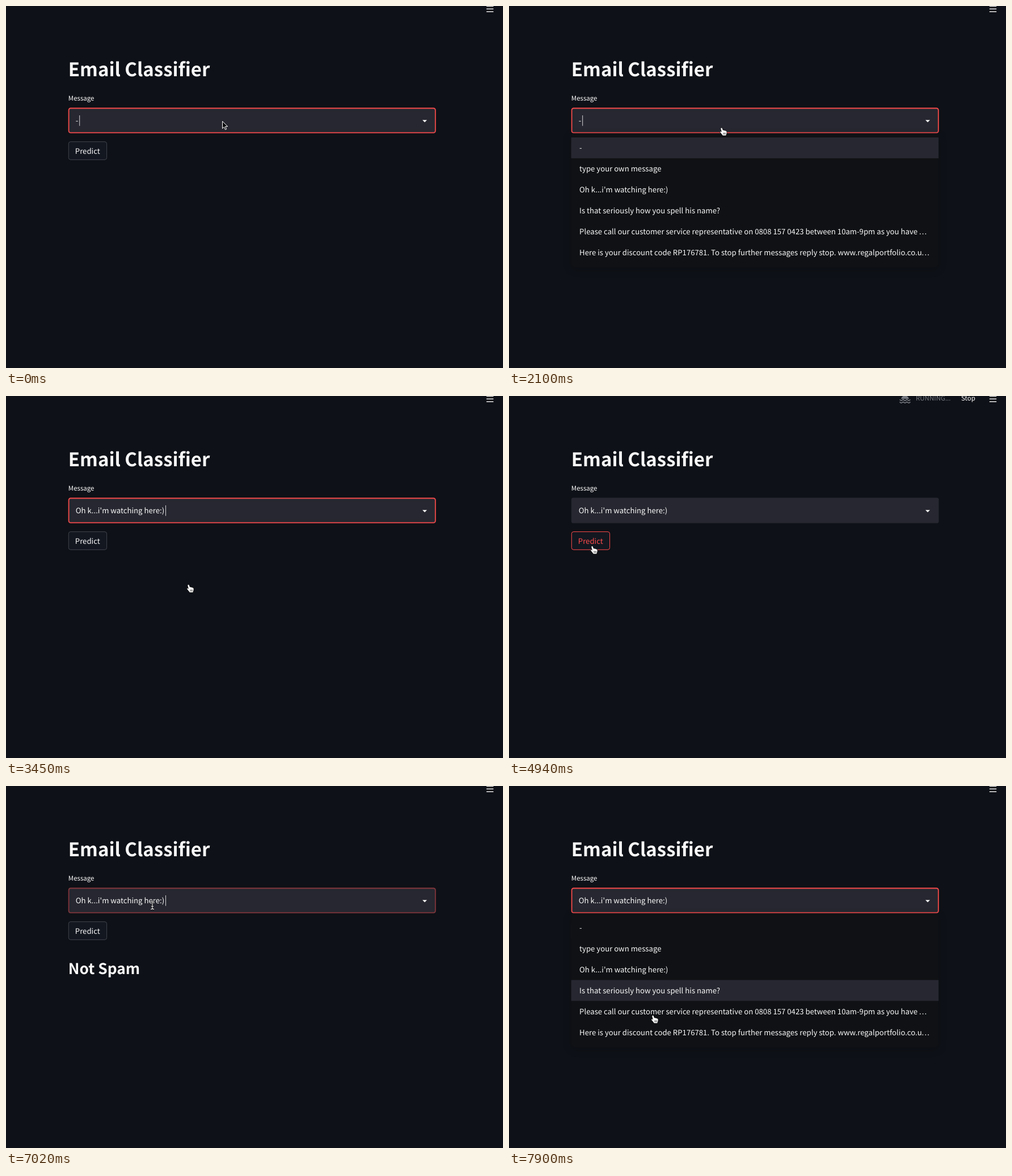
Write an HTML page with a canvas that moves like this. It is 876 px wide and 639 px high and loops after 8 s.

```html
<!DOCTYPE html>
<html lang="en">
<head>
<meta charset="utf-8">
<title>Email Classifier</title>
<style>
  html, body { margin: 0; width: 100%; height: 100%; overflow: hidden; background: #0e1117; }
  canvas { display: block; width: 876px; height: 639px; }
</style>
</head>
<body>
<canvas id="stage"></canvas>
<script>
const W = 876, H = 639, LOOP = 8000;
const FONT = '"Noto Sans CJK JP", "Noto Sans CJK SC", "Noto Sans CJK KR", "Open Sans", sans-serif';
const BG = '#0e1117', PANEL = '#262730', INK = '#fafafa', RED = '#ff4b4b';
const BODY = 13.18, SMALL = 11.53;
const ROW = 36.83, LIST_TOP = 232;
const OPTIONS = [
  '-',
  'type your own message',
  "Oh k...i'm watching here:)",
  'Is that seriously how you spell his name?',
  'Please call our customer service representative on 0808 157 0423 between 10am-9pm as you have …',
  'Here is your discount code RP176781. To stop further messages reply stop. www.regalportfolio.co.u…'
];

// Step tracks: [start, value]
const focus = [[0, 1], [1650, 0.1], [1800, 0.5], [1950, 1], [4490, 0.35], [4640, 0], [7020, 0.45], [7170, 1]];
const caret = [[0, 1], [450, 0], [900, 1], [1350, 0], [1950, 1], [2400, 0], [2850, 1], [3300, 1],
  [3750, 0], [4200, 1], [4490, 0], [7020, 1], [7460, 0]];
const menu = [[0, 0], [1950, 1], [3300, 0], [7170, 1]];
const hover = [[0, 0], [2400, 1], [2550, 2], [7600, 1], [7750, 2], [7900, 3]];
const chosen = [[0, 0], [3300, 2]];
const running = [[0, 0], [3600, 1], [5230, 0]];
const result = [[0, 0], [5230, 1]];
const button = [[0, 0], [4340, 1], [5530, 0.4], [5680, 0]];
const pointer = [
  [0, ['arrow', 381, 203]], [1950, ['hand', 384, 212]], [2100, ['hand', 378, 222]],
  [2250, ['hand', 358, 258]], [2400, ['hand', 340, 294]], [2550, ['hand', 331, 325]],
  [2700, ['hand', 328, 333]], [2850, ['hand', 326, 338]], [3000, ['hand', 325, 340]],
  [3750, ['arrow', 312, 331]], [3900, ['arrow', 270, 314]], [4050, ['arrow', 214, 293]],
  [4200, ['arrow', 172, 276]], [4340, ['hand', 150, 272]], [5530, ['arrow', 192, 246]],
  [5680, ['beam', 243, 218]], [5820, ['beam', 258, 210.5]], [7310, ['hand', 258, 220]],
  [7460, ['hand', 258, 254]], [7600, ['hand', 258, 312]], [7750, ['hand', 257, 372]],
  [7900, ['hand', 257, 412]]
];

const canvas = document.getElementById('stage');
const ctx = canvas.getContext('2d');
const dpr = window.devicePixelRatio || 1;
canvas.width = W * dpr;
canvas.height = H * dpr;

const arrowPath = new Path2D('M.5 .5V13.2L3.4 10.5L5.5 15.2L7.6 14.3L5.5 9.7H9.7Z');
const handPath = new Path2D('M-4.7-5.4C-4.7-7.2-2.5-7.4-2-5.6L-1.1-2.5C0-3.1 1-2.8 1.4-2' +
  'C2.3-2.5 3.1-2.2 3.5-1.4C4.7-1.8 5.5-1 5.6 .4C5.9 2.6 4.8 4.4 4.3 6.6H-1.2' +
  'C-2.4 4.6-4 3-5.6 1C-6.3-.2-4.8-1-3.6 .2L-3 .8Z');
const handLines = new Path2D('M-.2 1.6V4.8M1.6 1.6V4.8M3.3 1.6V4.8');
const beamPath = new Path2D('M-3-7Q0-7 0-5Q0-7 3-7M0-5V5M-3 7Q0 7 0 5Q0 7 3 7M-2 2H2');

function at(track, t) {
  let value = track[0][1];
  for (const [start, v] of track) if (start <= t) value = v;
  return value;
}

function text(str, x, y, size, color = INK, weight = 400) {
  ctx.font = `${weight} ${size}px ${FONT}`;
  ctx.fillStyle = color;
  const cut = str.endsWith('…');
  const main = cut ? str.slice(0, -1) : str;
  ctx.fillText(main, x, y);
  if (cut) {
    // baseline dots instead of the centred CJK ellipsis
    const end = x + ctx.measureText(main).width;
    for (let i = 0; i < 3; i++) ctx.fillText('.', end + i * 4.8, y);
  }
}

function box(x, y, w, h, r, fill, stroke, line = 1) {
  ctx.beginPath();
  ctx.roundRect(x, y, w, h, r);
  if (fill) { ctx.fillStyle = fill; ctx.fill(); }
  if (stroke) { ctx.strokeStyle = stroke; ctx.lineWidth = line; ctx.stroke(); }
}

function drawHeader(t) {
  ctx.fillStyle = INK;
  for (const y of [-0.3, 4.5, 9.3]) ctx.fillRect(846.8, y, 12.4, 1.4);
  if (!at(running, t)) return;
  const grey = '#777980';
  ctx.fillStyle = ctx.strokeStyle = grey;
  ctx.beginPath();
  ctx.moveTo(691, 5);
  ctx.quadraticCurveTo(692, 0, 698, -1);
  ctx.quadraticCurveTo(704, 0, 705, 5);
  ctx.fill();
  ctx.lineWidth = 1.6;
  for (const y of [7.2, 11.4]) {
    ctx.beginPath();
    for (let x = 688.5; x <= 707.5; x += 0.5) ctx.lineTo(x, y + Math.cos((x - 698) * 0.95) * 0.9);
    ctx.stroke();
  }
  text('RUNNING...', 717, 8.4, SMALL, grey);
  text('Stop', 797, 8.4, SMALL);
}

function drawSelect(t) {
  box(109.8, 179.6, 647.8, 45, 3.7, PANEL);
  const f = at(focus, t);
  if (f) box(110.6, 180.5, 646.2, 43.2, 3.4, null, `rgba(255,75,75,${f * 0.95})`, 1.8);
  const value = OPTIONS[at(chosen, t)];
  text(value, 122.7, 207.2, BODY);
  if (at(caret, t)) {
    ctx.fillStyle = '#d5d5d8';
    ctx.fillRect(at(chosen, t) ? 281 : 129.2, 193, 1, 18.6);
  }
  ctx.fillStyle = INK;
  ctx.beginPath();
  ctx.moveTo(734, 201.2);
  ctx.lineTo(742, 201.2);
  ctx.lineTo(738, 205.2);
  ctx.fill();
}

function drawButton(t) {
  const k = at(button, t);
  const mix = (a, b) => Math.round(a + (b - a) * k);
  const edge = `rgb(${mix(65, 255)},${mix(68, 75)},${mix(76, 75)})`;
  const ink = `rgb(${mix(250, 255)},${mix(250, 75)},${mix(250, 75)})`;
  box(110.3, 239.6, 67.3, 31.7, 3.6, '#131720', edge, 1);
  text('Predict', 121.8, 260.6, BODY, ink);
}

function drawMenu(t) {
  if (!at(menu, t)) return;
  ctx.save();
  ctx.shadowColor = 'rgba(0,0,0,0.16)';
  ctx.shadowBlur = 15 * dpr;
  ctx.shadowOffsetY = 4 * dpr;
  box(109.6, 224.8, 648, 236.6, [0, 0, 7, 7], '#0f1114');
  ctx.restore();
  const h = at(hover, t);
  ctx.fillStyle = PANEL;
  if (t >= 2100 && t < 7310 || t >= 7460 || h) ctx.fillRect(109.6, LIST_TOP + h * ROW, 647.6, ROW);
  OPTIONS.forEach((s, i) => text(s, 124.1, LIST_TOP + (i + 0.5) * ROW + 5, BODY));
}

function drawPointer(t) {
  const [kind, x, y] = at(pointer, t);
  ctx.save();
  ctx.translate(x, y);
  ctx.lineJoin = 'round';
  if (kind === 'arrow') {
    ctx.fillStyle = '#08090c';
    ctx.strokeStyle = '#fff';
    ctx.lineWidth = 1;
    ctx.fill(arrowPath);
    ctx.stroke(arrowPath);
  } else if (kind === 'hand') {
    ctx.strokeStyle = '#111';
    ctx.lineWidth = 1.4;
    ctx.stroke(handPath);
    ctx.fillStyle = '#fff';
    ctx.fill(handPath);
    ctx.lineWidth = 0.7;
    ctx.stroke(handLines);
  } else {
    ctx.strokeStyle = '#111';
    ctx.lineWidth = 2.6;
    ctx.stroke(beamPath);
    ctx.strokeStyle = '#f2f2f2';
    ctx.lineWidth = 1.1;
    ctx.stroke(beamPath);
  }
  ctx.restore();
}

function draw(t) {
  ctx.setTransform(dpr, 0, 0, dpr, 0, 0);
  ctx.textBaseline = 'alphabetic';
  ctx.textRendering = 'geometricPrecision';
  ctx.fillStyle = BG;
  ctx.fillRect(0, 0, W, H);
  drawHeader(t);
  text('Email Classifier', 109.8, 123.8, 33, INK, 700);
  text('Message', 109.8, 166.6, SMALL);
  drawSelect(t);
  drawButton(t);
  if (at(result, t)) text('Not Spam', 109.8, 332.2, 26.3, INK, 600);
  drawMenu(t);
  drawPointer(t);
}

const start = performance.now();
function tick() {
  draw((performance.now() - start) % LOOP);
  requestAnimationFrame(tick);
}
tick();
</script>
</body>
</html>
```
